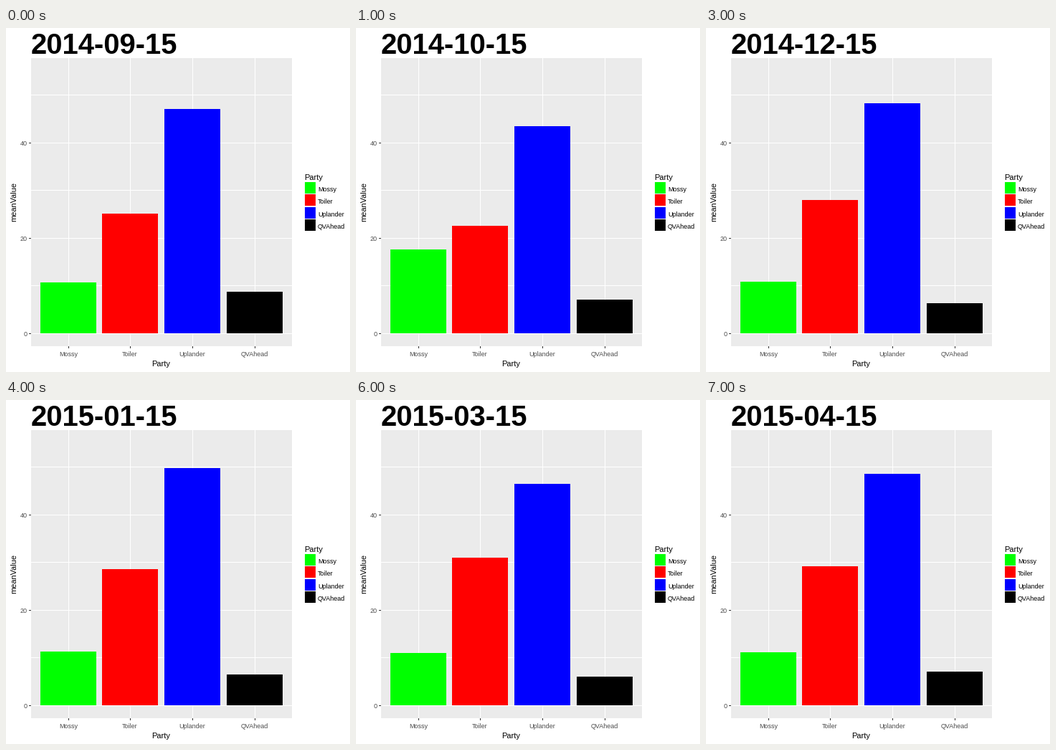
These frames come from a looping animation (480 px wide and 480 px high, 8 s). A matplotlib script:

```python
import matplotlib.pyplot as plt
from matplotlib.animation import FuncAnimation
from matplotlib.patches import Rectangle

SIZE = 480
DPI = 100
LEFT, RIGHT, TOP, BOTTOM = 35, 399, 42, 444
ZERO_Y, UNIT = 425.7, 6.645          # pixel row of zero, pixels per unit
CENTRES = [87, 173, 260, 347]
BAR_LEFTS = [48, 134, 221, 308]
BAR_WIDTH = 78

PARTIES = ["Mossy", "Toiler", "Uplander", "QVAhead"]
COLOURS = ["#00ff00", "#ff0000", "#0000ff", "#000000"]

# One row of mean values per month, starting in September 2014
VALUES = [
    [10.6, 25.1, 47.1, 8.7],
    [17.5, 22.5, 43.4, 7.0],
    [14.5, 24.0, 49.5, 6.4],
    [10.8, 28.0, 48.2, 6.3],
    [11.2, 28.6, 49.8, 6.5],
    [11.0, 30.5, 49.0, 6.0],
    [11.0, 31.0, 46.5, 6.0],
    [11.1, 29.2, 48.6, 7.0],
]

plt.rcParams["font.family"] = "Liberation Sans"
fig = plt.figure(figsize=(SIZE / DPI, SIZE / DPI), dpi=DPI, facecolor="white")
ax = fig.add_axes([0, 0, 1, 1])
ax.set_xlim(0, SIZE)
ax.set_ylim(SIZE, 0)
ax.axis("off")


def box(x, y, w, h, colour, z=1):
    return ax.add_patch(Rectangle((x, y), w, h, facecolor=colour, linewidth=0,
                                  antialiased=False, zorder=z))


def label(x, y, text, px, colour="black", **kwargs):
    """Text whose baseline sits on pixel row y."""
    return ax.text(x, y, text, fontsize=px * 72 / DPI, color=colour,
                   va="baseline", zorder=5, **kwargs)


def row(value):
    return round(ZERO_Y - UNIT * value)


def draw_panel():
    box(LEFT, TOP, RIGHT - LEFT, BOTTOM - TOP, "#ebebeb")
    for value in (10, 30, 50):
        box(LEFT, row(value), RIGHT - LEFT, 1, "white", 2)
    for value in (0, 20, 40):
        y = row(value)
        box(LEFT, y, RIGHT - LEFT, 1, "white", 2)
        box(LEFT - 3, y, 3, 1, "#333333", 2)
        label(30, y + 4, str(value), 9, "#4d4d4d", ha="right")
    for x, party in zip(CENTRES, PARTIES):
        box(x, TOP, 1, BOTTOM - TOP, "white", 2)
        box(x, BOTTOM, 1, 3, "#333333", 2)
        label(x, 458, party, 9, "#4d4d4d", ha="center")
    label(216.5, 472, "Party", 11, ha="center")
    ax.text(15.5, 243, "meanValue", fontsize=11 * 72 / DPI, rotation=90,
            ha="right", va="center", rotation_mode="default").set(
                ha="center", x=11.5)


def draw_legend():
    label(416, 212, "Party", 11)
    for y, party, colour in zip((215, 232, 250, 267), PARTIES, COLOURS):
        box(417, y, 15, 16, colour)
        label(435, y + 13, party, 9)


draw_panel()
draw_legend()
title = label(34.5, 36, "", 40, weight="bold")
bars = [box(x, row(0), BAR_WIDTH, 0, colour, 3)
        for x, colour in zip(BAR_LEFTS, COLOURS)]


def update(i):
    years, month = divmod(8 + i, 12)
    title.set_text(f"{2014 + years}-{month + 1:02d}-15")
    for bar, value in zip(bars, VALUES[i]):
        bar.set_y(row(value))
        bar.set_height(row(0) - row(value))
    return [title, *bars]


anim = FuncAnimation(fig, update, frames=len(VALUES), interval=1000,
                     repeat=True, repeat_delay=0, blit=False)
plt.show()
```
